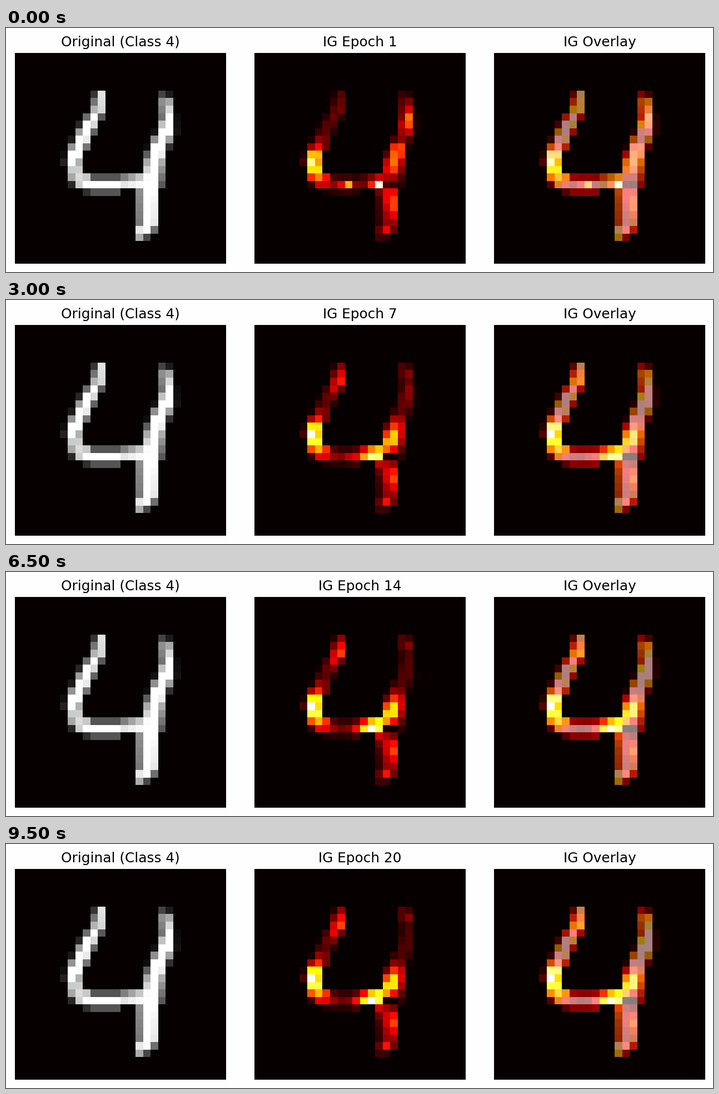
A matplotlib script for the animation above (10000 ms loop, 1272x440 px).

```python
import numpy as np
import matplotlib.pyplot as plt
from matplotlib.animation import FuncAnimation

DPI, WIDTH, HEIGHT = 80, 1272, 440
GRID = 28
SIDE, TOP, LEFT, PITCH = 379.9, 45.05, 16.05, 431
EPOCHS, STEP_MS = 20, 500
DECAY = 4.0  # epochs for the early pattern to fade by 1/e
BASE_HEAT = 0.1
FLOOR = (0.024, 0, 0)

plt.rcParams["font.family"] = "DejaVu Sans"
rows, cols = np.indices((GRID, GRID))
hot = plt.get_cmap("hot")


def curve(x, points):
    return np.interp(x, *zip(*points))


def stroke(along, across, centre, width):
    """Cell coverage of a band whose centre and width vary along one axis."""
    middle = curve(along, centre)
    half = curve(along, width) / 2
    covered = (np.minimum(middle + half, across + 1)
               - np.maximum(middle - half, across))
    inside = (along >= centre[0][0]) & (along <= centre[-1][0])
    return np.clip(covered, 0, 1) * inside


def draw_digit():
    arm = stroke(rows, cols,
                 centre=[(5, 11.34), (7, 11.07), (9, 9.85), (13, 7.97),
                         (14, 7.78), (15, 8.0)],
                 width=[(5, 1.1), (9, 2), (13, 2.05), (15, 1.6)])
    stem = stroke(rows, cols,
                  centre=[(5, 19.92), (8, 20.3), (10, 20), (12, 19.07),
                          (14, 18.5), (17, 18.1), (18, 17.72), (22, 17.72),
                          (24, 16.8)],
                  width=[(5, 0.38), (6, 1.22), (8, 1.5), (10, 2.15),
                         (18, 2.55), (23, 2.35), (24, 0.96)])
    bar = stroke(cols, rows,
                 centre=[(7, 16.75), (9, 17.2), (10, 17.5), (13, 17.5),
                         (14, 17.2), (16, 17.1)],
                 width=[(7, 0.82), (8, 1.67), (9, 1.97), (10, 1.66),
                        (13, 1.66), (14, 1.4), (16, 1.76)])
    return np.maximum.reduce([arm, stem, bar])


def blob(row, col, size):
    return np.exp(-((rows - row) ** 2 + (cols - col) ** 2) / size ** 2)


def attribution(epoch):
    """Heat per cell: each blob eases from its early to its settled strength."""
    early = np.exp(-(epoch - 1) / DECAY)

    def spot(row, col, size, start, end):
        return blob(row, col, size) * (end + (start - end) * early)

    left_arm = spot(14.5, 7.5, 2.4, 0.85, 1.0) + spot(7, 11, 1.8, 0.08, 0.45)
    joint = (spot(15.9, 15.7, 2.2, 0.15, 0.8) + spot(14.2, 18, 1.6, 0.4, 0.5)
             + spot(17.2, 14.6, 1.5, 0, 0.45) + spot(17, 17.4, 0.9, -0.2, -0.7))
    stem = spot(20, 18.4, 1.6, 0.4, 0.4) + spot(23.2, 17.4, 1, 0.3, 0.35)
    right_tip = spot(5, 19.8, 0.9, 0.3, 0.65)
    fading = (spot(8.3, 20.2, 1.8, 0.45, 0) + spot(12.3, 18.6, 1, 0.4, 0)
              + spot(17, 15.8, 0.7, 0.85, 0) + spot(17, 11.8, 0.8, 0.55, 0)
              + spot(18.3, 17.5, 0.8, 0.35, 0))
    field = BASE_HEAT + left_arm + joint + stem + right_tip + fading
    return np.clip(ink * field, 0, 1)


def lift_blacks(rgb):
    rgb[rgb.sum(axis=-1) < 0.06] = FLOOR
    return rgb


def heat_rgb(values):
    return hot(values)[..., :3]


def add_panel(index, title):
    ax = fig.add_axes([(LEFT + index * PITCH) / WIDTH,
                       1 - (TOP + SIDE) / HEIGHT,
                       SIDE / WIDTH, SIDE / HEIGHT])
    ax.axis("off")
    image = ax.imshow(np.zeros((GRID, GRID, 3)), interpolation="nearest",
                      aspect="auto")
    label = ax.set_title(title, fontsize=22.3, pad=10.8)
    return image, label


ink = draw_digit()
fig = plt.figure(figsize=(WIDTH / DPI, HEIGHT / DPI), dpi=DPI,
                 facecolor="#fefefe")
digit, _ = add_panel(0, "Original (Class 4)")
heat_map, epoch_label = add_panel(1, "IG Epoch 1")
overlay, _ = add_panel(2, "IG Overlay")
digit.set_data(lift_blacks(np.repeat(ink[..., None], 3, axis=2)))


def update(frame):
    epoch = frame + 1
    heat = heat_rgb(attribution(epoch))
    blend = (heat + heat_rgb(ink)) / 2
    heat_map.set_data(lift_blacks(heat))
    overlay.set_data(lift_blacks(blend))
    epoch_label.set_text(f"IG Epoch {epoch}")
    return heat_map, overlay, epoch_label


anim = FuncAnimation(fig, update, frames=EPOCHS, interval=STEP_MS,
                     repeat=True, repeat_delay=0, blit=False)
plt.show()
```
